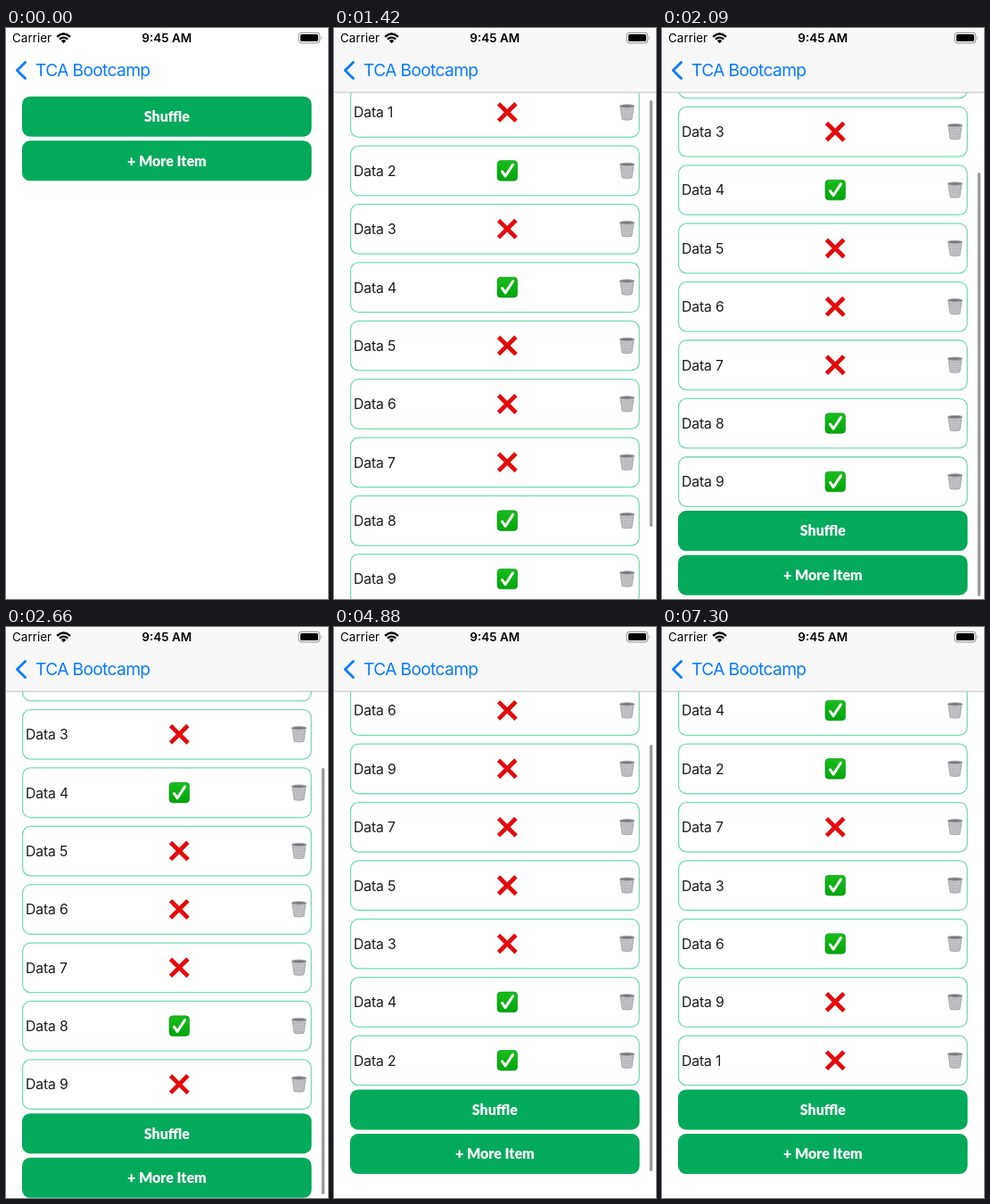
Recreate the animation shown at these times as an HTML page. Size 361x640 px, loop 7.99 s.

```html
<!DOCTYPE html>
<html lang="en">
<head>
<meta charset="utf-8">
<title>Shuffle list</title>
<style>
  html, body { margin: 0; width: 100%; height: 100%; overflow: hidden; background: #fff; }
  svg { display: block; width: 100vw; height: 100vh; }
  text { font-family: Inter, Roboto, sans-serif; }
  .status { font-size: 13.5px; }
  .clock { font-weight: 600; text-anchor: middle; }
  .back { font-size: 19.2px; letter-spacing: -.65px; fill: #087bfb; }
  .label { font-size: 15.8px; letter-spacing: -.15px; fill: #1c1c1c; }
  .button { font: 900 16px Lato, "Open Sans", sans-serif; fill: #fff; text-anchor: middle; }
</style>
</head>
<body>
<svg viewBox="0 0 361 640">
  <defs>
    <linearGradient id="green" x2="0" y2="1">
      <stop stop-color="#19bd1c"/><stop offset="1" stop-color="#00a50a"/>
    </linearGradient>
    <pattern id="mesh" width="3" height="3" patternUnits="userSpaceOnUse">
      <rect width="3" height="3" fill="#d9d9dc"/>
      <path d="M0 0L3 3M3 0L0 3" stroke="#98989d" stroke-width=".7"/>
    </pattern>
    <g id="cross">
      <path d="M-9.8-9.6L9.8 9.8M9.6-9.8L-9.8 9.6" stroke="#e40a0c" stroke-width="4.8"/>
    </g>
    <g id="check">
      <rect x="-11.3" y="-11.3" width="22.6" height="22.6" rx="4" fill="url(#green)" stroke="#079314" stroke-width=".6"/>
      <path d="M-5.8 1L-2.2 6.2L6.2-6.6" fill="none" stroke="#fff" stroke-width="3" stroke-linecap="round" stroke-linejoin="round"/>
    </g>
    <g id="trash">
      <path d="M-7.6-7L-5.4 8Q0 9.4 5.4 8L7.6-7Z" fill="url(#mesh)" stroke="#9b9ba0" stroke-width=".8"/>
      <ellipse cy="-7" rx="8.2" ry="1.7" fill="#77777c" stroke="#a9a9ad" stroke-width=".9"/>
    </g>
  </defs>

  <g id="list"></g>

  <g id="bar">
    <rect width="361" height="72" fill="#f8f8f8"/>
    <path d="M0 72.2H361" stroke="#b4b4b4" stroke-width=".8"/>
  </g>
  <rect id="thumb" x="353.8" width="3.4" rx="1.7" fill="#9c9c9c"/>

  <text class="status" x="7" y="16">Carrier</text>
  <g fill="none" stroke="#000" stroke-width="2.3">
    <path d="M57.2 9.8Q64.6 3.2 72 9.8M59.9 12.6Q64.6 8.6 69.3 12.6"/>
    <path d="M61.9 14.2Q64.6 12 67.3 14.2L64.6 17.2Z" fill="#000" stroke="none"/>
  </g>
  <text class="status clock" x="180.3" y="16">9:45 AM</text>
  <rect x="328.2" y="5.3" width="23.6" height="11.6" rx="3" fill="none" stroke="#8c8c8c"/>
  <rect x="330" y="7.1" width="20" height="8" rx="1.6"/>
  <path d="M353.2 9.2Q354.8 11.1 353.2 13Z" fill="#8c8c8c"/>

  <path d="M21.6 38.6L12.4 47.6L21.6 56.6" fill="none" stroke="#087bfb" stroke-width="2.8" stroke-linecap="round" stroke-linejoin="round"/>
  <text class="back" x="33" y="54.3">TCA Bootcamp</text>
</svg>

<script>
const DURATION = 7990;
const PITCH = 65.38;
const MAX_SCROLL = 119.9;

const FULL = '123456789', SHORTER = '12345679';
const FIRST_SHUFFLE = '16975342', SECOND_SHUFFLE = '54273691';

// start time, scroll offset, item order, checked items, scroll thumb opacity
const states = [
  [0, 0, '', '', 0],
  [250, 0, FULL, '2489', 0],
  [1420, 14.9, FULL, '2489', 1],
  [1530, 70, FULL, '2489', 1],
  [1640, 127, FULL, '2489', 1],
  [1740, 154.7, FULL, '2489', 1],
  [1850, 145, FULL, '2489', 1],
  [1960, 132, FULL, '2489', 1],
  [2070, 124, FULL, '2489', 1],
  [2190, 121, FULL, '2489', 1],
  [2660, MAX_SCROLL, FULL, '248', 1],
  [4010, 81.3, SHORTER, '24', 1],
  [4880, 81.3, FIRST_SHUFFLE, '24', 1],
  [5990, 81.3, SECOND_SHUFFLE, '24', .5],
  [6120, 81.3, SECOND_SHUFFLE, '24', 0],
  [6710, 81.3, SECOND_SHUFFLE, '234', 0],
  [7300, 81.3, SECOND_SHUFFLE, '2346', 0],
];

const byId = id => document.getElementById(id);

const row = (item, y, checked) => `
  <g transform="translate(0 ${y})">
    <rect x="18.6" y="-27.7" width="323.6" height="55.6" rx="9" fill="#fff" stroke="#74dcae" stroke-width="1.3"/>
    <text class="label" x="22" y="5.9">Data ${item}</text>
    <use href="#${checked ? 'check' : 'cross'}" x="194.3"/>
    <use href="#trash" x="328.5"/>
  </g>`;

const button = (label, y) => `
  <rect x="18" y="${y}" width="324.6" height="45" rx="9" fill="#03aa5b"/>
  <text class="button" x="180.3" y="${y + 28.3}">${label}</text>`;

function render([, scroll, order, checked, thumbOpacity]) {
  const rows = [...order].map((item, i) =>
    row(item, 109.4 + PITCH * i - scroll, checked.includes(item)));
  const end = 76.7 + PITCH * order.length - scroll;
  byId('list').innerHTML =
    rows.join('') + button('Shuffle', end) + button('+ More Item', end + 49.6);

  byId('bar').style.opacity = scroll > 0 ? 1 : 0;

  // The thumb shrinks against the bottom edge while overscrolled.
  const top = order.length === 8 ? 132
    : scroll < MAX_SCROLL ? 70 + .733 * scroll : 38 + scroll;
  const thumb = byId('thumb');
  thumb.setAttribute('y', top);
  thumb.setAttribute('height', Math.min(637, top + 478) - top);
  thumb.style.opacity = thumbOpacity;
}

let shown;
const start = performance.now();
function tick() {
  const time = (performance.now() - start) % DURATION;
  const state = states.findLast(([from]) => from <= time);
  if (state !== shown) render(shown = state);
  requestAnimationFrame(tick);
}
tick();
</script>
</body>
</html>
```
